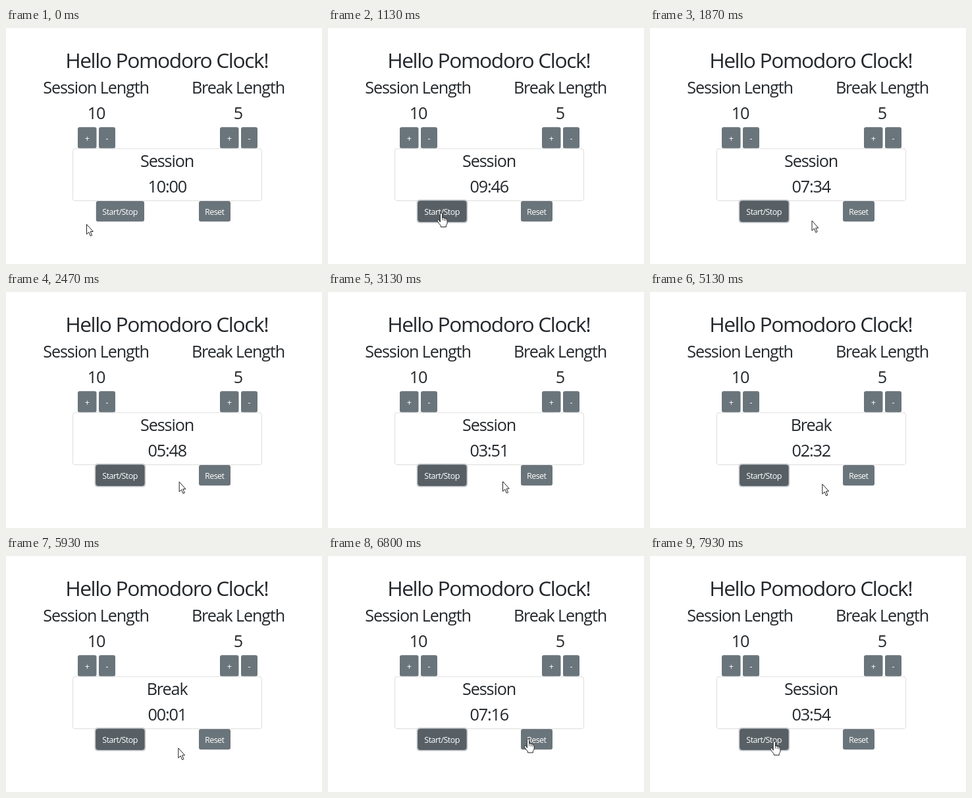
An HTML page that plays this animation: 480 by 360 pixels, repeating every 8 s.

```html
<!DOCTYPE html>
<html lang="en">
<head>
<meta charset="utf-8">
<title>Pomodoro Clock</title>
<style>
  html, body { margin: 0; width: 100%; height: 100%; overflow: hidden; background: #fff; }
  svg { display: block; width: 100%; height: 100%; }
  text {
    font-family: "Open Sans", "Noto Sans", sans-serif;
    letter-spacing: -.045em;
    text-anchor: middle;
    fill: #24282c;
  }
  .title { font-size: 31.8px; }
  .head { font-size: 25.2px; }
  .button rect { fill: #6a747b; }
  .button text { font-size: 12.6px; fill: #fff; }
  .button .ring { fill: #c3c7ca; visibility: hidden; }
  .button.focus .ring { visibility: visible; }
  .button.focus .face { fill: #586066; stroke: #50575e; }
  .pointer path { fill: #fff; stroke: #222; stroke-linejoin: round; }
</style>
</head>
<body>
<svg viewBox="0 0 480 360">
  <text class="title" x="244.2" y="60.6">Hello Pomodoro Clock!</text>
  <g class="head">
    <text x="136.5" y="100">Session Length</text>
    <text x="352.5" y="100">Break Length</text>
    <text x="137" y="139.2">10</text>
    <text x="352.5" y="139.2">5</text>
  </g>
  <g id="buttons"></g>
  <rect x="101.5" y="184" width="287" height="79.5" rx="3.5" fill="#fff" stroke="#dedede"/>
  <g class="head">
    <text id="label" x="244.6" y="211.6"></text>
    <text id="clock" x="244.8" y="250.8"></text>
  </g>
  <g id="lower"></g>
  <g id="pointer" class="pointer">
    <path id="arrow" d="M.5 .5V15.6L3.9 12.4L6.3 18.3L8.6 17.3L6.2 11.5H10.3Z"/>
    <g id="hand">
      <path d="M-1.6 14V2Q-1.6 .3 0 .3Q1.6 .3 1.6 2V8Q1.8 6.8 3 7Q4.4 7.1 4.4 8.7Q4.8 7.7 5.8 8Q7 8.2 7 9.6Q7.4 9 8.2 9.3Q9.2 9.7 9.2 11V15Q9.2 17.4 7.4 19V21.5H-.6V19.5Q-3.2 17 -5.7 12.7Q-6.4 11.2 -5.1 10.7Q-3.9 10.3 -2.8 11.8Z"/>
      <path d="M1.6 8V11.5M4.4 8.7V12M7 9.6V12.5" stroke-width=".8"/>
    </g>
  </g>
</svg>
<script>
const LOOP = 8000, FRAME = LOOP / 120;
const SESSION = 600, BREAK = 300;
const MOVE_TIME = 600;
const $ = id => document.getElementById(id);
const clamp = (v, lo, hi) => Math.min(hi, Math.max(lo, v));
const smooth = u => u * u * (3 - 2 * u);
const pad = n => String(n).padStart(2, "0");

function addButton(parent, x, y, w, h, caption) {
  const g = document.createElementNS("http://www.w3.org/2000/svg", "g");
  g.setAttribute("class", "button");
  g.innerHTML = `
    <rect class="ring" x="${x - 2.2}" y="${y - 2.2}" width="${w + 4.4}" height="${h + 4.4}" rx="4.5"/>
    <rect class="face" x="${x}" y="${y}" width="${w}" height="${h}" rx="3"/>
    <text x="${x + w / 2 - .3}" y="${y + h / 2 + 5}">${caption}</text>`;
  $(parent).append(g);
  return { g, contains: (px, py) => px > x && px < x + w && py > y && py < y + h };
}

for (const x of [109, 325]) {
  addButton("buttons", x, 151.3, 28.5, 32.5, "+");
  addButton("buttons", x + 32, 151.3, 25, 32.5, "-");
}
const start = addButton("lower", 136.8, 264, 73.2, 31.3, "Start/Stop");
const reset = addButton("lower", 293, 264, 48, 31.3, "Reset");

// The pointer rests, then glides to each next place.
const home = { x: 122, y: 299 };
const moves = [
  { at: 100, x: 172, y: 282 },
  { at: 1200, x: 245.5, y: 293.5 },
  { at: 2000, x: 265, y: 288.5 },
  { at: 4400, x: 261.3, y: 292.5 },
  { at: 6130, x: 304, y: 278.5 },
  { at: 7130, x: 188.8, y: 282.3 }
];

function pointerAt(t) {
  let { x, y } = home;
  for (const m of moves) {
    const u = smooth(clamp((t - m.at) / MOVE_TIME, 0, 1));
    x += (m.x - x) * u;
    y += (m.y - y) * u;
  }
  return { x, y };
}

// Clock seconds since the start; the clock runs a little faster midway.
function elapsed(t) {
  const base = .1775 * Math.max(0, t - 1050);
  const extra = .0118 * clamp(t - 3130, 0, 3770);
  return Math.round(base + extra);
}

function draw(t) {
  const second = elapsed(t) % (SESSION + BREAK);
  const working = second < SESSION;
  const left = working ? SESSION - second : SESSION + BREAK - second;
  $("label").textContent = working ? "Session" : "Break";
  $("clock").textContent = pad(Math.floor(left / 60)) + ":" + pad(left % 60);
  start.g.classList.toggle("focus", t >= 1000);

  const { x, y } = pointerAt(t);
  const over = start.contains(x, y) || reset.contains(x, y);
  $("pointer").setAttribute("transform", `translate(${x} ${y})`);
  $("arrow").style.display = over ? "none" : "";
  $("hand").style.display = over ? "" : "none";
}

const origin = performance.now();
function tick() {
  const t = Math.max(0, performance.now() - origin) % LOOP;
  const frame = Math.floor((t + 4) / FRAME) % 120;
  draw(Math.round(frame * FRAME / 10) * 10);
  requestAnimationFrame(tick);
}
tick();
</script>
</body>
</html>
```
